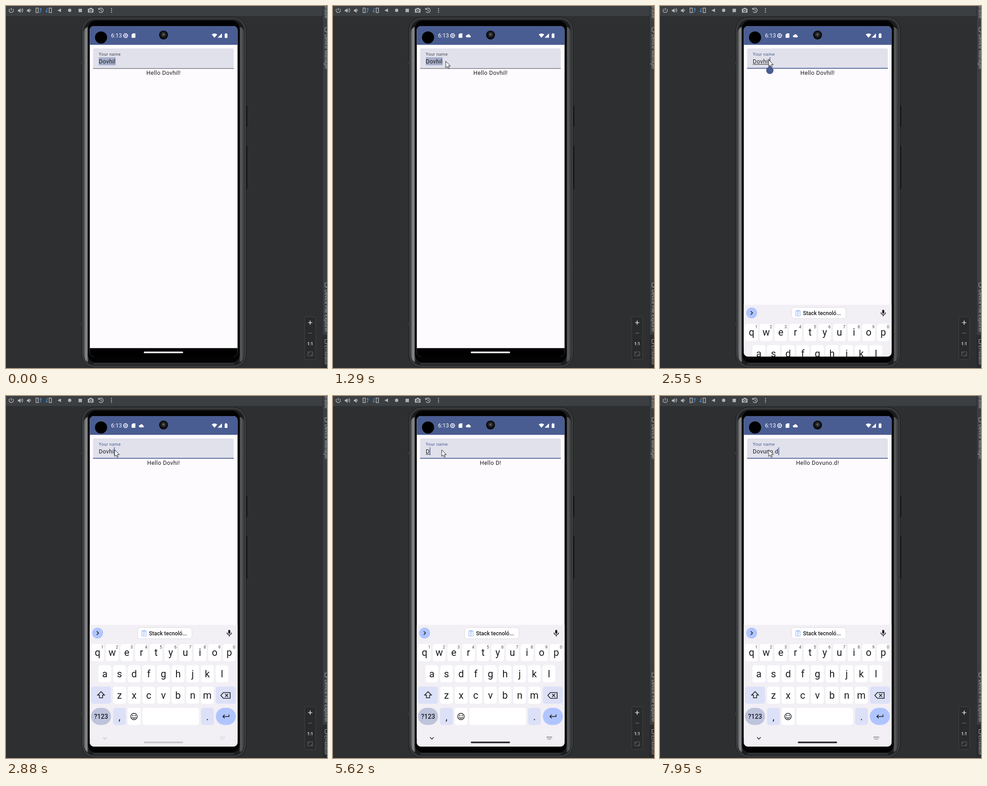
These frames come from a looping animation (706x794 px, 8 s). An HTML page:

```html
<!DOCTYPE html>
<html lang="en">
<head>
<meta charset="utf-8">
<title>Text field demo</title>
<style>
  html, body { margin: 0; width: 100%; height: 100%; overflow: hidden; background: #2e2f31; }
  svg { display: block; width: 706px; height: 794px; font-family: Roboto, sans-serif; }
  .tools { fill: none; stroke: #afb1b3; stroke-width: 1.5; }
  .solid { fill: #afb1b3; stroke: none; }
  .side { font-size: 10.8px; fill: #a9abb4; }
  .label { font-size: 9.5px; letter-spacing: .32px; }
  .body { font-size: 12.65px; letter-spacing: .4px; fill: #1b1b1f; }
  .key { font-size: 21.5px; fill: #1b1b1f; text-anchor: middle; }
  .hint { font-size: 9px; fill: #44464f; text-anchor: middle; }
  .line { fill: none; stroke: #1b1b1f; stroke-width: 1.6; }
</style>
</head>
<body>
<svg viewBox="0 0 706 794">
  <defs>
    <clipPath id="screen"><rect x="184.300" y="44" width="325" height="725" rx="9"/></clipPath>
    <linearGradient id="leftRim">
      <stop offset="0" stop-color="#3a3b3c"/><stop offset=".3" stop-color="#6a6b6c"/>
      <stop offset=".55" stop-color="#8f9091"/><stop offset=".8" stop-color="#5a5b5c"/>
      <stop offset="1" stop-color="#0c0c0c"/>
    </linearGradient>
    <linearGradient id="rightRim">
      <stop offset="0" stop-color="#161717"/><stop offset=".35" stop-color="#5c5d5e"/>
      <stop offset=".6" stop-color="#4a4b4c"/><stop offset="1" stop-color="#303132"/>
    </linearGradient>
    <radialGradient id="lens" cx=".5" cy=".45">
      <stop offset="0" stop-color="#777b80"/><stop offset=".25" stop-color="#36393d"/>
      <stop offset=".6" stop-color="#16181a"/><stop offset="1" stop-color="#050505"/>
    </radialGradient>
  </defs>

  <!-- window chrome -->
  <rect width="706" height="794" fill="#2e2f31"/>
  <rect width="706" height="22" fill="#3c3f41"/>
  <rect x="697" width="9" height="794" fill="#3c3f41"/>
  <rect x="697" y="721" width="9" height="73" fill="#292b2c"/>
  <path d="M696.500 0V794" stroke="#292a2b"/>
  <g class="tools">
    <path d="M8 6.200a4.800 4.800 0 1 0 7 0M11.500 4v6"/>
    <path class="solid" d="M26 8h2.500l3.500-3v10l-3.500-3H26zM46 8h2.500l3.500-3v10l-3.500-3H46z"/>
    <path d="M33.500 7.500q1.500 2 0 4M35 5q4 4.500 0 9M53.500 7.500q1.500 2 0 4"/>
    <path d="M66 4.500h5v10h-5zM95 4.500h5v10h-5z"/>
    <path stroke="#4a88c7" d="M73.500 14q4-1 3-7M74 7.500l2.500-2.500 1.500 3M92.500 5q-4 1-3 7M87.500 11l2 2.500 2.500-2"/>
    <path class="solid" d="M113 9.500l8-4v8zM159.500 6h7.500v7.500h-7.500zM180 6h3l1.500-2h4l1.500 2h2.500v8.500H180z"/>
    <circle class="solid" cx="140" cy="9.500" r="3.700"/>
    <circle cx="186.300" cy="10" r="2.300" stroke="#3c3f41"/>
    <path d="M204.500 12a5 5 0 1 0 0-5M203.500 4v3.500h3.500M209 6.500v3.500l2 1.500"/>
    <g class="solid"><circle cx="232" cy="5.500" r="1.200"/><circle cx="232" cy="9.500" r="1.200"/><circle cx="232" cy="13.500" r="1.200"/></g>
  </g>
  <g id="sidebar"></g>
  <g fill="none" stroke="#a9abb4"><path id="tab" d="M706 47.500h-4.500v8.500h4.500M706 57.500h-2"/><use href="#tab" y="560"/><use href="#tab" y="684"/></g>

  <rect x="657" y="681.500" width="24" height="94" rx="2" fill="#282a2b" stroke="#424446"/>
  <path d="M664.500 694.500h9M669 690v9" stroke="#d4d5d6" stroke-width="1.700"/>
  <path d="M664.500 717.500h9" stroke="#626466" stroke-width="1.400"/>
  <text x="669" y="743.500" font-size="9" font-weight="700" fill="#d4d5d6" text-anchor="middle">1:1</text>
  <path d="M663.500 758.500h11v9h-11zM665.500 763v-2.500h2.500M672.500 763v2.500H670" fill="none" stroke="#626466"/>

  <!-- phone -->
  <path d="M527 219h3.500v46H527zM527 307h3.500v94H527z" fill="#0d0e0e"/>
  <rect x="166.500" y="24.500" width="362" height="769" rx="29" fill="#2b2c2d" stroke="#1b1c1d"/>
  <rect x="168.500" y="26.500" width="358" height="765" rx="27" fill="none" stroke="#484a4b" stroke-width="1.500"/>
  <rect x="171.500" y="29.500" width="352" height="759" rx="24" fill="#1a1b1c" stroke="#353637"/>
  <path d="M182 45V782Q171 778 170 758V62Q171 48 182 45z" fill="url(#leftRim)"/>
  <path d="M512 45V782Q524 778 525 758V62Q524 48 512 45z" fill="url(#rightRim)"/>
  <path d="M166 122h3v7h-3zM525 122h3v7h-3zM166 694h3v7h-3zM525 694h3v7h-3z" fill="#3a3b3c"/>
  <rect x="180" y="32" width="334" height="750" rx="18" fill="#030303"/>
  <path d="M192 785h310" stroke="#303132" stroke-width="4"/>

  <g clip-path="url(#screen)">
    <rect x="184" y="44" width="326" height="725" fill="#fefbff"/>
    <rect x="184" y="44" width="326" height="41.200" fill="#4a5d92"/>
    <rect x="184" y="750.400" width="326" height="19" fill="#000"/>
    <rect x="303" y="758" width="86.500" height="3.500" rx="1.700" fill="#fff"/>

    <g fill="#fff">
      <text x="231" y="69.300" font-size="12.300" letter-spacing=".1">6:13</text>
      <circle cx="263" cy="65" r="3.900" fill="none" stroke="#fff" stroke-width="1.300"/>
      <circle cx="263" cy="65" r="4.900" fill="none" stroke="#fff" stroke-width="1.200" stroke-dasharray="1.900 1.950"/>
      <path d="M260.500 65h5M263 62.500v5" stroke="#fff"/>
      <path d="M279 60h5.500v9.800h-8.300v-7z"/>
      <path id="cloud" d="M294.500 68.800a2.400 2.400 0 0 1 .2-4.800 3.600 3.600 0 0 1 6.700 .7 2.100 2.100 0 0 1 .2 4.100z"/>
      <path d="M458.500 69.800l-6-7.300q6-4.500 12 0z"/>
      <path d="M475 60v9.500h-9.500z"/>
      <path d="M481 61h1.500v-1.300h3V61h1.500v9h-6z"/>
    </g>

    <path d="M191.500 137.500V97a4 4 0 0 1 4-4H497a4 4 0 0 1 4 4v40.500z" fill="#e1e1ec"/>
    <g id="idle">
      <text class="label" x="204" y="109" fill="#45464f">Your name</text>
      <path d="M191.500 137.100h309.500" stroke="#45464f"/>
    </g>
    <g id="focused">
      <text class="label" x="204" y="109" fill="#4a5d92">Your name</text>
      <path d="M191.500 136.700h309.500" stroke="#4a5d92" stroke-width="1.700"/>
    </g>
    <rect id="selection" x="204" y="112.500" height="17.500" fill="#a5aec9"/>
    <text id="entry" class="body" x="204" y="126"></text>
    <rect id="underline" x="204" y="127.500" height="1" fill="#1b1b1f"/>
    <rect id="caret" y="112.500" width="1.500" height="17.500" fill="#4a5d92"/>
    <text id="greeting" class="body" x="346.500" y="151" text-anchor="middle"></text>
    <path id="grip" d="M0 2.500L5 6.300A8 8 0 1 1-5 6.300z" fill="#4a5d92"/>

    <g id="keyboard">
      <rect x="184" y="502" width="326" height="268" fill="#f2eff5"/>
      <circle cx="201.500" cy="520" r="12" fill="#b0c5ff"/>
      <path class="line" d="M199.500 516l4 4-4 4"/>
      <rect x="289.500" y="508" width="119.500" height="24.500" rx="6" fill="#fff" stroke="#dcdbe2"/>
      <path d="M298.500 515.500h10v11h-10zM301 514h5v3h-5zM300.500 519.500h6M300.500 522h6M300.500 524.500h4" fill="none" stroke="#98b4f8"/>
      <text x="314.500" y="524.800" font-size="12" font-weight="500" fill="#1b1b1f">Stack tecnoló...</text>
      <rect x="488.700" y="513" width="4.600" height="8.500" rx="2.300" fill="#1b1b1f"/>
      <path class="line" stroke-width="1.400" d="M486 519a5 5 0 0 0 10 0M491 524v3.500"/>
      <g id="keys"></g>
      <path class="line" d="M209 648.500l-7.500 7.500h4v6h7v-6h4z"/>
      <path class="line" d="M478 650.500h15v12.500h-15l-5.500-6.200zM482 653.500l6.500 6.500M488.500 653.500l-6.500 6.500"/>
      <text x="209" y="708" font-size="14" font-weight="500" fill="#1b1b1f" text-anchor="middle">?123</text>
      <circle class="line" cx="281.500" cy="703" r="7"/>
      <path class="line" d="M278 704.500q3.500 5 7 0"/>
      <circle cx="279" cy="701" r="1.200"/><circle cx="284" cy="701" r="1.200"/>
      <path class="line" d="M490.500 698.500v4.500h-13.500M481 699l-4 4 4 4"/>
      <g id="nav">
        <path class="line" stroke-width="1.200" d="M213.500 748.500l4 4 4-4"/>
        <path d="M470 747.500h11.500M470 750h11.500M472.500 753h6.500" stroke="#1b1b1f" stroke-dasharray="1.500 1"/>
        <rect x="303" y="758" width="86.500" height="3.500" rx="1.700" fill="#1b1b1f"/>
      </g>
    </g>
  </g>
  <circle cx="209" cy="69" r="13.300"/>
  <circle cx="346.500" cy="63.500" r="9.800" fill="url(#lens)"/>
  <path id="pointer" d="M0 0V14.500L3.300 11.500 5.500 16.500 7.800 15.500 5.700 10.600H10.200Z" fill="#fff" stroke="#17181a"/>
</svg>
<script>
const LOOP = 8000;
const $ = id => document.getElementById(id);

function add(parent, tag, attrs, text = '') {
  const node = document.createElementNS('http://www.w3.org/2000/svg', tag);
  for (const name in attrs) node.setAttribute(name, attrs[name]);
  node.textContent = text;
  parent.append(node);
  return node;
}

const sideTabs = [[-4, 'Gradle'], [62, 'Device Manager'], [622, 'Device File Explorer'], [744, 'Emulator']];
for (const [y, name] of sideTabs) {
  add($('sidebar'), 'text', { class: 'side', transform: `translate(701 ${y}) rotate(90)` }, name);
}

function addKey(x, y, width, fill, rx = 5) {
  add($('keys'), 'rect', { x, y, width, height: 37.5, rx, fill });
}

const rows = [['qwertyuiop', 201.3, 544], ['asdfghjkl', 217.4, 590.5], ['zxcvbnm', 249.6, 637.5]];
rows.forEach(([letters, left, top], row) => {
  [...letters].forEach((letter, i) => {
    const x = left + i * 32.2;
    addKey(x - 14, top, 28, '#fff');
    add($('keys'), 'text', { class: 'key', x, y: top + 26 }, letter);
    if (row === 0) add($('keys'), 'text', { class: 'hint', x: x + 10.5, y: top + 10 }, (i + 1) % 10);
  });
});
addKey(187, 637.5, 44, '#dce1f8');
addKey(461.5, 637.5, 44, '#dce1f8');
addKey(187, 684, 44, '#bec4dc', 18.7);
addKey(235.5, 684, 28, '#dce1f8');
addKey(267.5, 684, 28.5, '#fff');
addKey(300, 684, 124.5, '#fff');
addKey(429, 684, 28, '#dce1f8');
addKey(461.5, 684, 44, '#b0c5ff', 18.7);
add($('keys'), 'text', { class: 'key', x: 249.5, y: 711 }, ',');
add($('keys'), 'text', { class: 'key', x: 443, y: 711 }, '.');

// Each track is a list of [time, value]
const typed = [
  [0, 'Dovhil'], [2880, 'Dovhi'], [3020, 'Dovh'], [3100, 'Dov'], [3200, 'Do'], [3300, 'D'],
  [5820, 'Do'], [6020, 'Dov'], [6350, 'Dovu'], [6620, 'Dovun'], [6760, 'Dovuno'],
  [7820, 'Dovuno.'], [7950, 'Dovuno.d']
];
const composing = [[0, 0], [2220, 1], [2880, 0], [3440, 1], [5820, 0], [6950, 1], [7820, 0]];
const blink = [[0, 0], [2550, 1], [4140, 0], [4630, 1], [5160, 0], [5620, 1], [7290, 0], [7750, 1]];
const navShade = [[0, .2], [3440, .4], [3640, .55], [3840, .68], [3920, .8], [4000, .92]];
const pointerPath = [
  [70, 660, 783], [300, 560, 610], [600, 370, 320], [850, 248, 150], [980, 237, 124],
  [1100, 250, 122], [1230, 249, 121], [1290, 248, 121], [1490, 246, 118], [1560, 242, 112], [1620, 239, 118]
];

const at = (track, t) => track.findLast(([start]) => start <= t)[1];
const clamp = v => Math.min(1, Math.max(0, v));
const show = (id, on) => $(id).setAttribute('opacity', +on);

function pointerAt(t) {
  const next = pointerPath.findIndex(([time]) => time > t);
  if (next < 0) return pointerPath.at(-1).slice(1);
  const [t0, x0, y0] = pointerPath[next - 1];
  const [t1, x1, y1] = pointerPath[next];
  const k = (t - t0) / (t1 - t0);
  return [x0 + (x1 - x0) * k, y0 + (y1 - y0) * k];
}

let shownText;
function draw(t) {
  const text = at(typed, t);
  if (text !== shownText) {
    shownText = text;
    $('entry').textContent = text;
    $('greeting').textContent = `Hello ${text}!`;
    const width = $('entry').getComputedTextLength();
    $('selection').setAttribute('width', width);
    $('underline').setAttribute('width', width);
    $('caret').setAttribute('x', 204 + width);
    $('grip').setAttribute('transform', `translate(${204.5 + width} 128.7)`);
  }
  const focus = clamp((t - 1880) / 150);
  show('idle', 1 - focus);
  show('focused', focus);
  show('selection', t < 1890);
  show('grip', t >= 2010 && t < 2880);
  show('underline', at(composing, t));
  show('caret', at(blink, t));
  show('cloud', t >= 600);

  const rise = clamp((t - 2500) / 300);
  $('keyboard').setAttribute('transform', `translate(0 ${268 * (1 - rise) ** 3})`);
  show('keyboard', t >= 2550);
  show('nav', at(navShade, t));

  // The pointer is sampled in steps of about 64 ms while it travels in
  show('pointer', t >= 70);
  if (t >= 70) {
    const stepped = t < 1100 ? 70 + Math.floor((t - 70) / 64.4) * 64.4 : t;
    $('pointer').setAttribute('transform', `translate(${pointerAt(stepped)})`);
  }
}

const start = performance.now();
function tick(now) {
  draw(Math.max(0, now - start) % LOOP);
  requestAnimationFrame(tick);
}
draw(0);
requestAnimationFrame(tick);
</script>
</body>
</html>
```
